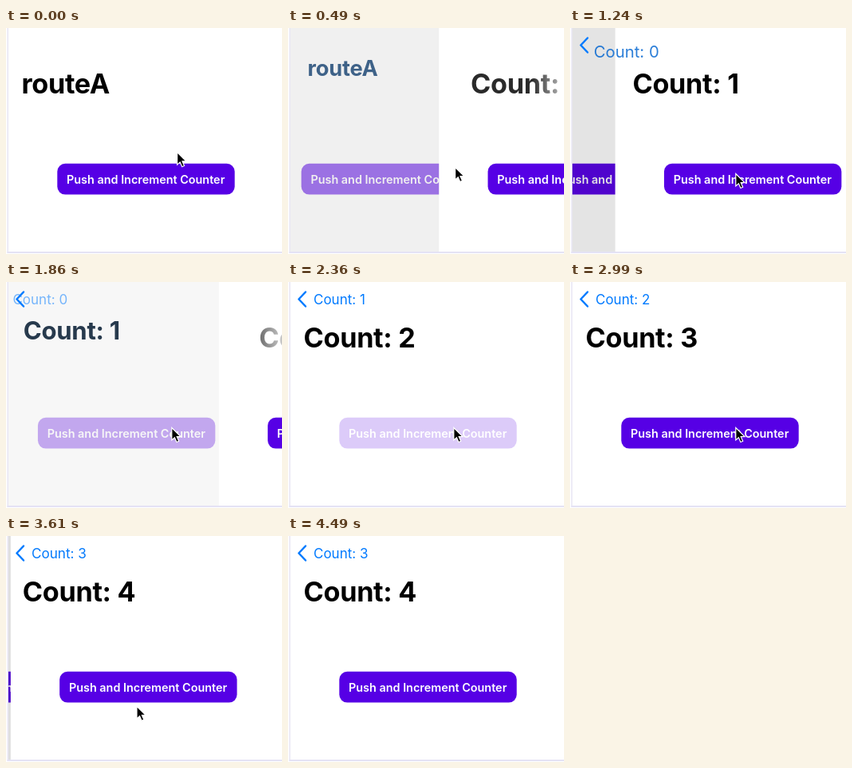
These frames come from a looping animation (346x283 px, 4620 ms). An HTML page:

```html
<!DOCTYPE html>
<html lang="en">
<head>
<meta charset="utf-8">
<title>Navigation stack</title>
<style>
  html, body { margin: 0; width: 100%; height: 100%; overflow: hidden; background: #fff; }
  svg { display: block; width: 100vw; height: 100vh; }
  text { font-family: Inter, "Liberation Sans", sans-serif; white-space: pre; }
  .title { font-size: 34.2px; font-weight: 700; letter-spacing: -.3px; }
  .back { font-size: 17px; fill: #007aff; }
  .label { font-size: 14.4px; font-weight: 600; fill: #fff; }
</style>
</head>
<body>
<svg viewBox="0 0 346 283">
  <defs>
    <clipPath id="screen"><rect x="3" width="343" height="280"/></clipPath>
    <linearGradient id="ink" gradientUnits="userSpaceOnUse" x1="306" x2="346" y1="0" y2="0">
      <stop offset="0"/><stop offset="1" stop-opacity=".3"/>
    </linearGradient>
    <g id="button">
      <rect x="64.3" y="169.7" width="222.4" height="38.9" rx="10" fill="#5600e5"/>
      <text class="label" x="175.2" y="194.5" text-anchor="middle">Push and Increment Counter</text>
    </g>
  </defs>
  <rect width="346" height="283" fill="#fff"/>
  <rect x="1.5" width="1.5" height="282" fill="#e8e6f4"/>
  <rect x="1.5" y="280" width="344.5" height="2" fill="#e4e2f5"/>
  <g clip-path="url(#screen)">
    <g id="under"><use href="#button" id="pressed"/></g>
    <rect id="dim" x="3" width="343" height="280"/>
    <g id="over">
      <rect x="3" width="345" height="280" fill="#fff"/>
      <use href="#button"/>
    </g>
    <path id="chevron" d="M22 12.5L13.5 21.5L22 30.5" fill="none" stroke="#007aff" stroke-width="2.5" stroke-linecap="round" stroke-linejoin="round"/>
    <text id="oldBack" class="back" y="27.5"></text>
    <text id="morph"></text>
    <text id="title" class="title" y="81.8" fill="url(#ink)"></text>
  </g>
  <path id="cursor" d="M0 0V15.5L3.6 12.2L6.1 18L8.9 16.8L6.4 11.2H11.2Z" stroke="#fff" stroke-width="1.2"/>
</svg>
<script>
const LOOP = 4620, TICK = 125, WIDTH = 345, SLIDE = 500;
const names = ["routeA", "Count: 0", "Count: 1", "Count: 2", "Count: 3", "Count: 4"];
// push start, press lead time
const pushes = [[401, 150], [1043, 150], [1820, 150], [2490, 300], [3190, 180]];
// time, x, y
const path = [[0, 214.6, 155.7], [115, 211, 172], [490, 209.6, 174.5], [865, 207.8, 182.5],
  [3365, 207.8, 182.5], [3610, 164.7, 212.6], [3865, 128, 245], [4110, 96, 290]];

const el = {};
document.querySelectorAll("svg [id]").forEach(e => el[e.id] = e);
const clamp = v => Math.min(1, Math.max(0, v));
const mix = (a, b, k) => a + (b - a) * k;
const set = (e, attrs) => { for (const k in attrs) e.setAttribute(k, attrs[k]); };
const shift = (e, x, y = 0) => e.setAttribute("transform", `translate(${x} ${y})`);

function slide(x) {
  const curve = (a, b, s) => 3 * (1 - s) ** 2 * s * a + 3 * (1 - s) * s * s * b + s ** 3;
  if (x <= 0 || x >= 1) return clamp(x);
  let lo = 0, hi = 1;
  for (let i = 0; i < 24; i++) {
    const mid = (lo + hi) / 2;
    if (curve(.35, .33, mid) < x) lo = mid; else hi = mid;
  }
  return curve(.91, .97, lo);
}

function pressOpacity(t, [start, lead]) {
  const release = start - 24;
  if (t < release) return mix(1, .2, clamp((t - start + lead) / 120));
  const k = clamp((t - release) / 250);
  return mix(.2, 1, k < .5 ? 2 * k * k : 1 - 2 * (1 - k) ** 2);
}

function drawMorph(name, p) {
  const q = p ** 1.2, bold = q < .6;
  el.morph.textContent = name;
  set(el.morph, {
    x: mix(19.5, 32, q), y: mix(81.8, 27.5, q),
    "font-size": bold ? mix(34.2, 16.5, q) : mix(35, 17, q),
    "font-weight": bold ? 700 : 400,
    "letter-spacing": bold ? -.3 * (1 - q) : 0,
    fill: `rgb(0 ${122 * q} ${255 * q})`,
    opacity: 1 - 1.1 * q * (1 - q)
  });
}

function drawCursor(t) {
  const i = path.findIndex(k => k[0] > t);
  if (i < 0) return shift(el.cursor, 0, 400);
  const [a, b] = [path[i - 1], path[i]], k = (t - a[0]) / (b[0] - a[0]);
  shift(el.cursor, mix(a[1], b[1], k), mix(a[2], b[2], k));
}

function draw(t) {
  // index of the latest push; -1 before the first
  const done = pushes.filter(p => t >= p[0]).length - 1;
  const p = done < 0 ? 1 : slide((t - pushes[done][0]) / SLIDE);
  const next = pushes[done + 1];

  shift(el.over, WIDTH * (1 - p));
  shift(el.under, -.3 * WIDTH * p);
  el.dim.setAttribute("opacity", .126 * p);
  el.pressed.setAttribute("opacity", done < 0 ? 1 : pressOpacity(t, pushes[done]));
  el.over.lastElementChild.setAttribute("opacity", next ? pressOpacity(t, next) : 1);

  el.title.textContent = names[done + 1];
  set(el.title, { x: 19.5 + Math.max(0, 392 * (1 - p) - 2), opacity: clamp(.6 + p / 2) });
  el.chevron.setAttribute("opacity", done < 0 ? 0 : done ? 1 : clamp(2 * p - 1));
  drawMorph(done < 0 ? "" : names[done], p);
  el.oldBack.textContent = done > 0 ? names[done - 1] : "";
  set(el.oldBack, { x: 32 - 100 * p, opacity: clamp(1 - 2 * p) });
  drawCursor(t);
}

const origin = performance.now();
function frame() {
  const t = (performance.now() - origin) % LOOP;
  draw(Math.max(0, Math.floor((t + 15) / TICK) * TICK - 10));
  requestAnimationFrame(frame);
}
frame();
</script>
</body>
</html>
```
